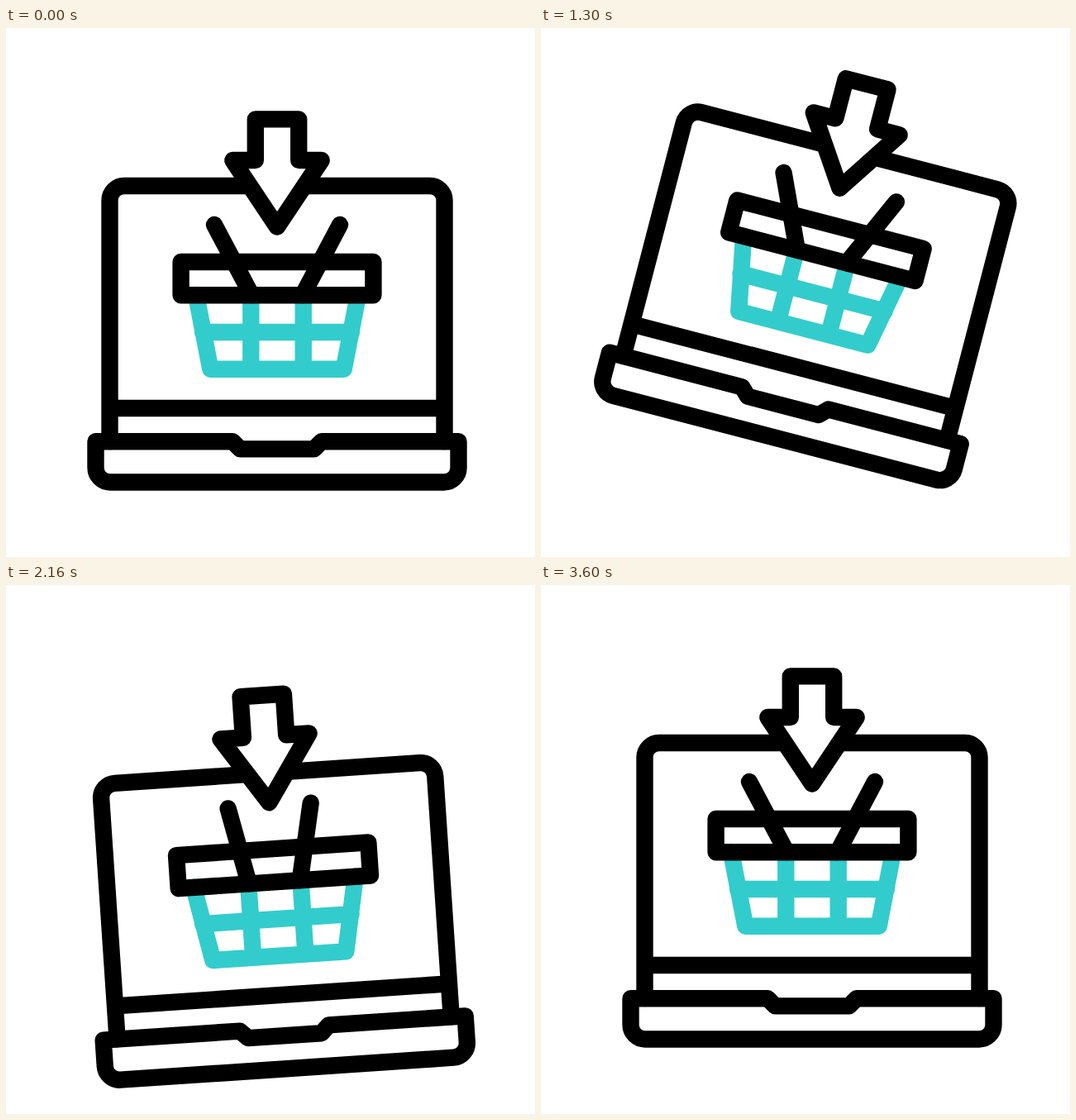
An HTML page that plays this animation: 640 by 640 pixels, repeating every 3.62 s.

```html
<!DOCTYPE html>
<html lang="en">
<head>
<meta charset="utf-8">
<title>Online shopping</title>
<style>
  html, body { margin: 0; width: 100%; height: 100%; overflow: hidden; background: #fff; }
  svg { display: block; width: 100%; height: 100%; }
  g { fill: none; stroke: #000; stroke-width: 20.4; stroke-linecap: round; stroke-linejoin: round; }
  .basket { stroke: #3cc; }
  #arrow { fill: #fff; }
</style>
</head>
<body>
<svg viewBox="0 0 640 640">
  <g id="scene">
    <path d="M125.5 500V208.5A17.5 17.5 0 0 1 143 191H513A17.5 17.5 0 0 1 530.5 208.5V500M125.5 460H530.5"/>
    <path d="M108.5 500.2H274.2L283.5 509.4H372.5L381.8 500.2H547.5V532A17.5 17.5 0 0 1 530 549.5H126A17.5 17.5 0 0 1 108.5 532Z"/>
    <path class="basket" d="M230 323L247.3 412.7H408.7L426 323M238 368H418M296.3 323V412.7M359.7 323V412.7"/>
    <path d="M211.6 283H444.4V323.2H211.6Z"/>
    <path id="handles"/>
    <path id="arrow" d="M301.8 110.4H354.2V160H381.7L328 240.5L274.3 160H301.8Z"/>
  </g>
</svg>
<script>
  const [scene, handles, arrow] = ['scene', 'handles', 'arrow'].map(id => document.getElementById(id));
  const LOOP = 3620, STEP = 1200;
  const ANGLES = [0, 15, -6, 0], SHIFTS = [0, -50, 46, 0];

  const ease = p => p * p * (3 - 2 * p);
  const lerp = (a, b, p) => a + (b - a) * p;

  function keyed(values, t) {
    const i = Math.min(Math.floor(t / STEP), values.length - 2);
    return lerp(values[i], values[i + 1], ease(t / STEP - i));
  }

  function draw(now) {
    const t = Math.min(now % LOOP, 3 * STEP);
    // Rises and falls once per step
    const lift = ease(1 - Math.abs(1 - (t % STEP) / (STEP / 2)));
    const x = lerp(252, 326, lift), y = lerp(238, 217, lift);

    scene.setAttribute('transform', `translate(0 ${keyed(SHIFTS, t)}) rotate(${keyed(ANGLES, t)} 328 370.4)`);
    handles.setAttribute('d', `M${x} ${y}L297 323M${656 - x} ${y}L359 323`);
    arrow.setAttribute('transform', `translate(0 ${-39 * lift})`);
  }

  const start = performance.now();
  function tick() {
    draw(performance.now() - start);
    requestAnimationFrame(tick);
  }
  tick();
</script>
</body>
</html>
```
